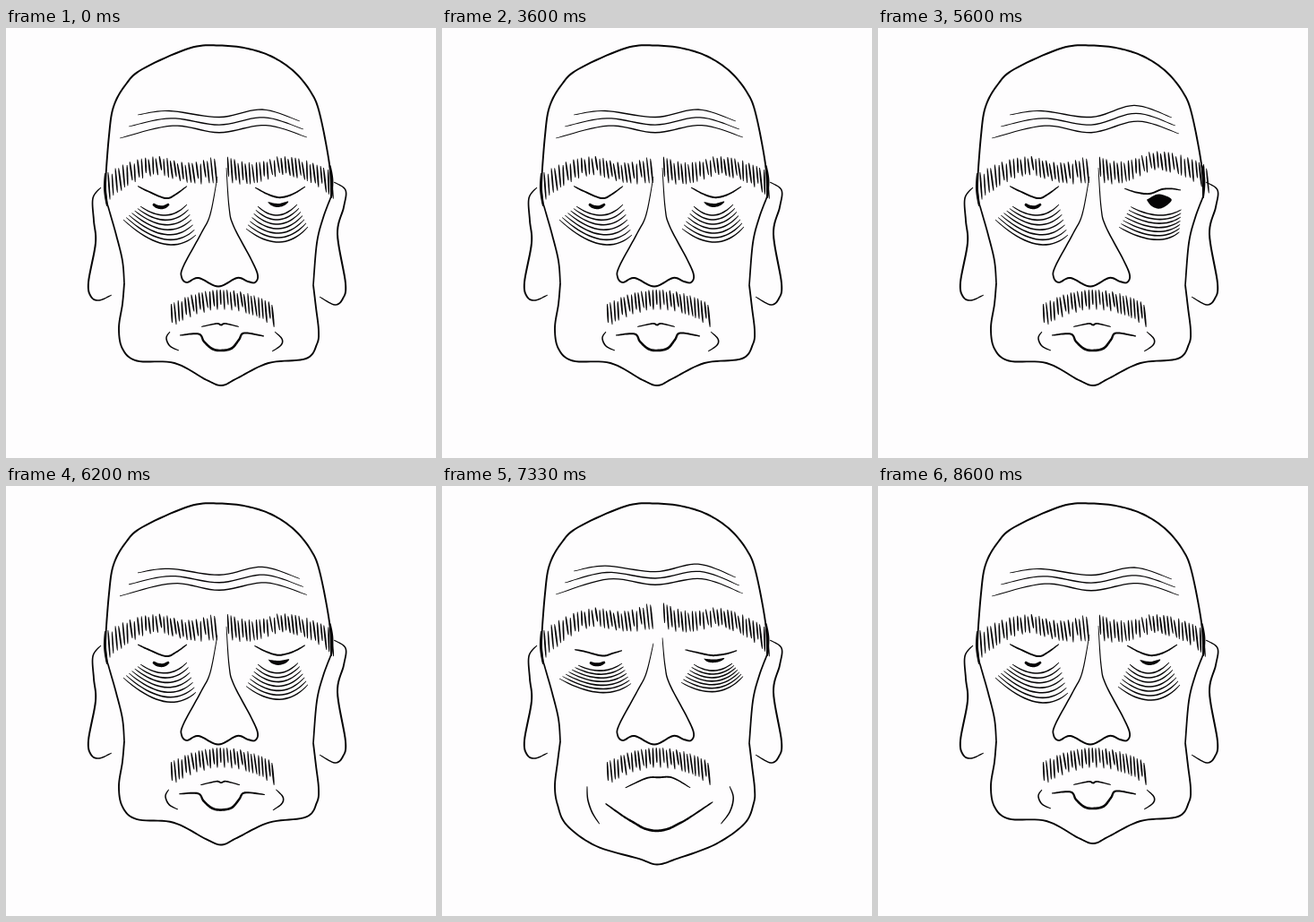
Animation of 480x480 px, one loop 8.67 s. Source, as an HTML page with a canvas:

```html
<!DOCTYPE html>
<html lang="en">
<head>
<meta charset="utf-8">
<title>Tired face</title>
<style>
html, body { margin: 0; width: 100%; height: 100%; overflow: hidden; background: #fefdfe; }
canvas { display: block; width: 480px; height: 480px; }
</style>
</head>
<body>
<canvas id="c"></canvas>
<script>
const LOOP = 8670, FRAMES = 130;
const canvas = document.getElementById('c');
const ctx = canvas.getContext('2d');
const dpr = window.devicePixelRatio || 1;
canvas.width = canvas.height = 480 * dpr;

// Eased 0..1 between two times
function ease(t, from, to) {
  const x = Math.min(1, Math.max(0, (t - from) / (to - from)));
  return (1 - Math.cos(Math.PI * x)) / 2;
}
// The jaw stretches slowly and snaps back; the eye snaps open and closes slowly
const stretch = t => 1.65 * ease(t, 5850, 8340) ** 1.1 * (1 - ease(t, 8340, 8560));
const stare = t => ease(t, 3930, 4130) * (1 - ease(t, 4930, 6400));

// "x y, x y" -> [[x, y], ...]
const pts = s => s.split(',').map(p => p.trim().split(' ').map(Number));
const blend = (a, b, k) => a.map((p, i) => p.map((n, c) => n + (b[i][c] - n) * k));

// A shape has a rest pose, a stretched pose and a staring pose
const shape = (rest, jaw = rest, wide = rest) => [rest, jaw, wide].map(pts);
const pose = ([rest, jaw, wide], u, v) => rest.map((p, i) =>
  p.map((n, c) => n + u * (jaw[i][c] - n) + v * (wide[i][c] - n)));

// Catmull-Rom coordinate
function spline(a, b, c, d, t) {
  const k1 = c - a, k2 = 2 * a - 5 * b + 4 * c - d, k3 = 3 * (b - c) + d - a;
  return b + t / 2 * (k1 + t * (k2 + t * k3));
}

function curve(p, n = 10) {
  const out = [], at = i => p[Math.max(0, Math.min(i, p.length - 1))];
  for (let i = 0; i < p.length - 1; i++) {
    for (let s = 0; s < n; s++) {
      const q = [at(i - 1), at(i), at(i + 1), at(i + 2)];
      out.push([0, 1].map(k => spline(q[0][k], q[1][k], q[2][k], q[3][k], s / n)));
    }
  }
  out.push(at(p.length));
  return out;
}

// Parabola through start, middle and end
function arc([a, m, b], n = 20) {
  return Array.from({ length: n + 1 }, (_, i) => {
    const t = i / n, r = 1 - t;
    return [0, 1].map(k => r * (r - t) * a[k] + 4 * r * t * m[k] + t * (t - r) * b[k]);
  });
}

function fill(p) {
  ctx.beginPath();
  p.forEach(q => ctx.lineTo(q[0], q[1]));
  ctx.closePath();
  ctx.fill();
}

// Brush stroke along samples: width w in the middle, w * tip at both ends
function brush(c, w, tip = .4) {
  const n = c.length - 1, left = [], right = [];
  c.forEach((q, i) => {
    const a = c[Math.max(i - 1, 0)], b = c[Math.min(i + 1, n)];
    const dx = b[0] - a[0], dy = b[1] - a[1], len = Math.hypot(dx, dy) || 1;
    const h = w / 2 * (tip + (1 - tip) * Math.sqrt(Math.max(0, Math.sin(Math.PI * i / n))));
    left.push([q[0] - dy / len * h, q[1] + dx / len * h]);
    right.unshift([q[0] + dy / len * h, q[1] - dx / len * h]);
  });
  fill(left.concat(right));
}

// [shape, width, tip]
const lines = [
  [shape('113 198, 111 176, 115 120, 120 88, 133 64, 152 46, 205 22.5, 238 19.5, 270 23, 298 32.5, 322 49, 340 71, 350 95, 361 152, 363 188'), 2, .9],
  [shape('113 196, 123 231, 130 260, 132 285'), 1.8, .9],
  [shape('363 188, 354 212, 347 240, 343 287'), 1.8, .9],
  [shape('111 162, 110.5 180, 113 199'), 3],
  [shape('361.5 153, 364 170, 363 190'), 2.8],
  [shape('132 285, 130 308, 126 335, 130 358, 146 371.5, 188 374, 224 393, 241 399, 258 391, 293 374, 335 369, 347 353, 349 338, 346 312, 343 287',
    '132 285, 129 308, 126 335, 129 356, 139 379, 171 403, 219 417, 240 423.5, 263 417, 306 401, 338 377, 348 354, 349 338, 346 312, 343 287'), 1.9, .95],
  [shape('106 178, 97 190, 98 215, 100 240, 92 284, 95 300, 104 304, 118 298'), 2],
  [shape('366 172, 379 181, 377 200, 370 230, 379 285, 376 302, 367 309, 350 300'), 2],
  [shape('236 166, 228 208, 218 229, 198 266, 196 278, 202 284, 215 279, 237 288.5, 258 279, 270 283, 278 284, 281 276, 274 259, 254 221, 249 200, 246 156',
    '236 176, 228 209, 218 229, 198 266, 196 278, 202 284, 215 279, 237 288.5, 258 279, 270 283, 278 284, 281 276, 274 259, 254 221, 249 201, 246 170'), 2, .3],
  [shape('147 176.5, 158 182, 178 190, 189 186, 202 176.5', '148 183, 158 184.5, 179 189.5, 190 187, 201 184'), 2],
  [shape('278 178, 291 185, 303 189, 313 188, 323 184, 334 177',
    '271 183, 285 186, 300 189, 310 188.5, 319 187, 329 184',
    '273 180, 285 182, 303 182, 320 174, 332 176, 341 184'), 2],
  [shape('164 196.5, 169 199.5, 176 200, 182 196.5', '165 197, 170 199, 176 199, 182 196.5'), 4],
  [shape('218 333.5, 235 330, 240 331.5, 245 330, 260 333.5', '204 337, 228 326, 242 325, 258 325.5, 278 337'), 1.9],
  [shape('194 343, 215 341.5, 221 350, 230 358, 240 360, 252 357.5, 260 348, 266 340.5, 288 344',
    '182 355, 202 370, 214 377, 226 383.5, 239 386, 252 384, 264 378.5, 276 372, 303 353'), 2.7],
  [shape('183 339, 179 346, 183 355, 193 360', '161 335, 162 350, 167 365, 175 378'), 1.6],
  [shape('300 339, 308 347, 307 354, 297 361', '322 335, 326 348, 322 364, 312 378'), 1.6]
];

const pupil = shape('292 194, 304 196, 315 193.5, 311 198, 303 200, 296 198, 292 194',
  '292 192.5, 304 193.5, 315 192, 311 195.5, 303 197, 296 196, 292 192.5',
  '306 190, 320 177.5, 337 189, 331 198, 322 203, 312 199, 306 190');

// Innermost and outermost fold under each eye
const bags = [
  [shape('150 199, 178 209, 202 197', '152 200, 178 206, 201 198'),
   shape('131 214, 176 241, 212 231', '131 215, 176 230, 211 220')],
  [shape('281 199, 303 209, 325 197', '281 199, 303 206, 324 198', '283 200, 320 209, 349 207'),
   shape('268 224, 305 239, 337 222', '267 219, 305 229, 336 212', '270 221, 310 234, 336 232')]
];

let seed = 411;
const rnd = () => (seed = seed * 16807 % 2147483647) / 2147483647;

// Hairs between two envelopes, alternating long and short
function hairs(x0, x1, top, height) {
  return Array.from({ length: 30 }, (_, i) => {
    const x = x0 + (x1 - x0) * i / 29, h = height(x);
    const y0 = top(x) + h * .14 * (i % 2) * rnd();
    const y1 = top(x) + h * (1 - (i % 2 ? .05 : .3) * rnd());
    return { x, y0, y1, lean: 1 + 1.4 * (rnd() - .5), w: 1.6 + .4 * rnd() };
  });
}
const browTop = x => 143 + (x < 175 ? 18 * ((175 - x) / 60) ** 2 : 7 * Math.sin(Math.PI * (x - 175) / 59));
const browHeight = x => 22 + 9 * ((x - 175) / 60) ** 2;
const browLift = x => -14 * Math.max(0, (x - 115) / 119) ** .8;
const bow = x => ((x - 242) / 57) ** 2;
const flip = x => 480 - x;

const browL = hairs(115, 234, browTop, browHeight);
const browR = hairs(248, 364, x => browTop(flip(x)), x => browHeight(flip(x)));
const tache = hairs(185, 298, x => 292 + 16 * bow(x), x => 23 + 4 * bow(x));

function drawHairs(list, dy = () => 0, dx = () => 0) {
  for (const h of list) {
    const x = h.x + dx(h.x), y = dy(h.x);
    brush(arc([[x - h.lean, h.y0 + y], [x, (h.y0 + h.y1) / 2 + y], [x + h.lean, h.y1 + y]], 8), h.w);
  }
}

function drawWrinkles(u, v) {
  for (let k = 0; k < 3; k++) {
    brush(curve([
      [147 - 10 * k, 97 + 13 * k - 2 * u],
      [182 + 2 * k, 92.5 + 8.3 * k - u * (3.5 + k)],
      [238, 99.5 + 8.6 * k - u * (4 + 1.4 * k)],
      [286 + 2 * k, 91 + 8.8 * k - u * (4 + .6 * k) - 8 * v],
      [328 + 4 * k, 104 + 9 * k - 2 * u - 7 * v]
    ]), 1.4);
  }
}

function draw(t) {
  const u = stretch(t), v = stare(t);
  ctx.setTransform(dpr, 0, 0, dpr, 0, 0);
  ctx.fillStyle = '#fefdfe';
  ctx.fillRect(0, 0, 480, 480);
  ctx.fillStyle = '#060506';

  for (const [s, w, tip] of lines) brush(curve(pose(s, u, v)), w, tip);
  fill(curve(pose(pupil, u, v)));
  drawWrinkles(u, v);
  for (const [inner, outer] of bags) {
    const a = pose(inner, u, v), b = pose(outer, u, v);
    for (let i = 0; i < 7; i++) brush(arc(blend(a, b, i / 6)), 1.6);
  }
  drawHairs(browL, x => u * browLift(x));
  drawHairs(browR, x => u * browLift(flip(x)) - 11 * v * ease(x, 250, 325),
    x => 7 * v * ease(x, 300, 364));
  drawHairs(tache);
}

const start = performance.now();
let shown = -1;
function tick() {
  const t = (performance.now() - start) % LOOP;
  const step = Math.floor((t + 4) * FRAMES / LOOP) % FRAMES;
  if (step !== shown) draw((shown = step) * LOOP / FRAMES);
  requestAnimationFrame(tick);
}
tick();
</script>
</body>
</html>
```
